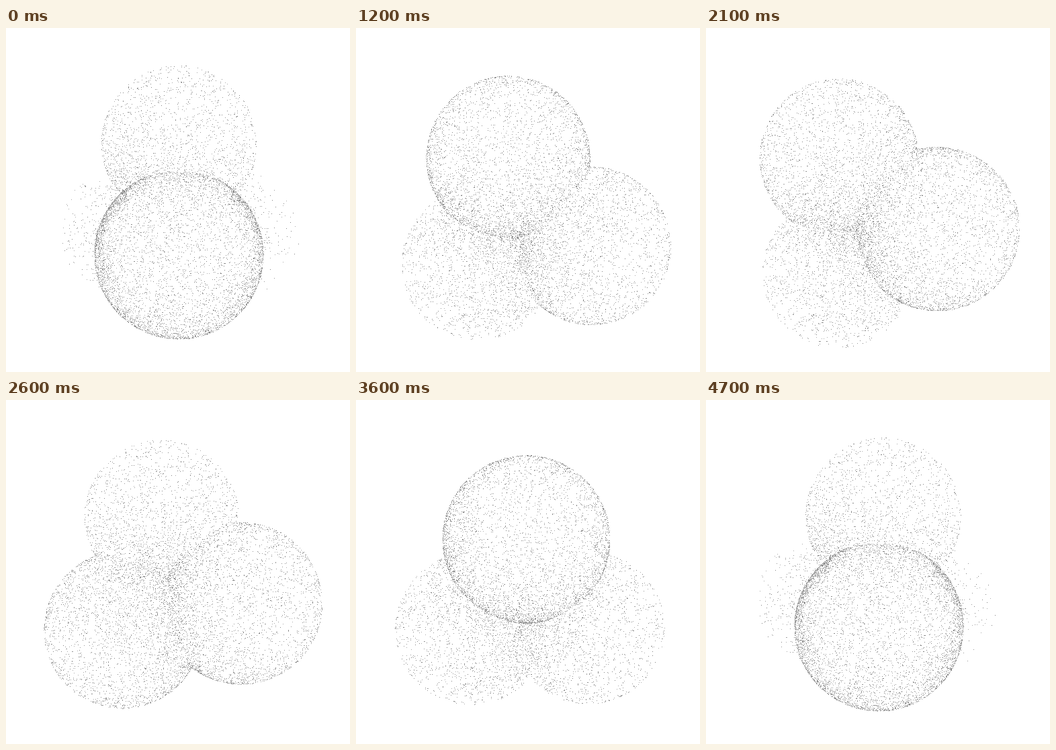
An HTML page with a canvas that plays this animation: 512 px wide and 512 px high, repeating every 4.8 s.

```html
<!DOCTYPE html>
<html lang="en">
<head>
<meta charset="utf-8">
<title>Four lobes</title>
<style>
  html, body { margin: 0; width: 100%; height: 100%; overflow: hidden; background: #fff; }
  canvas { display: block; }
</style>
</head>
<body>
<canvas id="stage" width="512" height="512"></canvas>
<script>
const ctx = document.getElementById("stage").getContext("2d");
const LOOP = 4800, STEP = 100;
const CENTER = { x: 257, y: 278 }, CAMERA = 900;
const OFFSET = 104, RADIUS = 112;
const COUNT = 8000, TONES = ["#828282", "#969696", "#aaaaaa"];

// Poses: time, direction of the main lobe, direction between the side lobes.
const poses = [
  { t: 0, main: [0, .5, .87], side: [1, 0, 0] },
  { t: 800, main: [0, -.77, .64], side: [1, 0, 0] },
  { t: 1700, main: [-.6, -.55, .58], side: [.84, -.33, .43] },
  { t: 2600, main: [-.24, -.96, .13], side: [.96, -.27, .15] },
  { t: 3100, main: [0, -.87, .49], side: [.9, -.2, -.4] },
  { t: 4100, main: [-.12, -.2, .97], side: [.9, .38, .19] },
  { t: 4700, main: [0, .5, .87], side: [1, .057, -.03] }
];

const dot = (a, b) => a[0] * b[0] + a[1] * b[1] + a[2] * b[2];
const cross = (a, b) => [
  a[1] * b[2] - a[2] * b[1], a[2] * b[0] - a[0] * b[2], a[0] * b[1] - a[1] * b[0]
];
const mix = (...terms) => [0, 1, 2].map(k => terms.reduce((sum, [w, v]) => sum + w * v[k], 0));
const unit = v => mix([1 / Math.hypot(...v), v]);

function random(seed) {
  return () => {
    seed = (seed + 0x6D2B79F5) | 0;
    let x = Math.imul(seed ^ (seed >>> 15), 1 | seed);
    x = (x + Math.imul(x ^ (x >>> 7), 61 | x)) ^ x;
    return ((x ^ (x >>> 14)) >>> 0) / 4294967296;
  };
}

// Fixed rays towards the viewer, thinner at the rim and at the upper right.
function makeRays() {
  const rnd = random(11), rays = [];
  while (rays.length < COUNT) {
    const x = rnd() * 2 - 1, y = rnd() * 2 - 1, rr = x * x + y * y;
    if (rr >= 1) continue;
    const z = Math.sqrt(1 - rr);
    if (rnd() < Math.sqrt(z) * (.78 + .2 * (y - x))) rays.push([x, y, z]);
  }
  return rays;
}
const rays = makeRays();

function poseAt(i) {
  const n = poses.length, turn = Math.floor(i / n), pose = poses[i - turn * n];
  return { ...pose, t: pose.t + turn * LOOP };
}

function slope(i, key) {
  const a = poseAt(i - 1), b = poseAt(i), c = poseAt(i + 1);
  const h0 = b.t - a.t, h1 = c.t - b.t, h = h0 + h1;
  return mix(
    [-h1 / (h0 * h), a[key]], [h1 / (h0 * h) - h0 / (h1 * h), b[key]], [h0 / (h1 * h), c[key]]
  );
}

// Closed cubic path through the poses.
function follow(t, key) {
  let i = poses.length - 1;
  while (poses[i].t > t) i--;
  const a = poseAt(i), b = poseAt(i + 1), h = b.t - a.t, s = (t - a.t) / h, r = 1 - s;
  return mix(
    [(1 + 2 * s) * r * r, a[key]], [s * r * r * h, slope(i, key)],
    [s * s * (3 - 2 * s), b[key]], [-s * s * r * h, slope(i + 1, key)]
  );
}

function lobesAt(t) {
  const main = unit(follow(t, "main")), raw = follow(t, "side");
  const side = unit(mix([1, raw], [-dot(raw, main), main]));
  const normal = cross(main, side);
  const wide = Math.sqrt(2 / 3), deep = Math.SQRT2 / 3;
  return [
    main,
    mix([-1 / 3, main], [-wide, side], [deep, normal]),
    mix([-1 / 3, main], [wide, side], [deep, normal]),
    mix([-1 / 3, main], [-2 * deep, normal])
  ];
}

// Distance from the middle to the outer face of the nearest lobe.
function reachAlong(ray, lobes) {
  const along = OFFSET * Math.max(...lobes.map(lobe => dot(lobe, ray)));
  return along + Math.sqrt(RADIUS ** 2 - OFFSET ** 2 + along ** 2);
}

function draw(t) {
  const lobes = lobesAt(t);
  ctx.fillStyle = "#fff";
  ctx.fillRect(0, 0, 512, 512);
  TONES.forEach((tone, k) => {
    ctx.fillStyle = tone;
    for (let i = k; i < COUNT; i += TONES.length) {
      const ray = rays[i], reach = reachAlong(ray, lobes);
      const scale = reach * CAMERA / (CAMERA - reach * ray[2]);
      ctx.fillRect(Math.round(CENTER.x + ray[0] * scale), Math.round(CENTER.y + ray[1] * scale), 1, 1);
    }
  });
}

const start = performance.now();
let shown = -1;
function tick() {
  const t = Math.floor(((performance.now() - start) % LOOP) / STEP) * STEP;
  if (t !== shown) draw(shown = t);
  requestAnimationFrame(tick);
}
tick();
</script>
</body>
</html>
```
